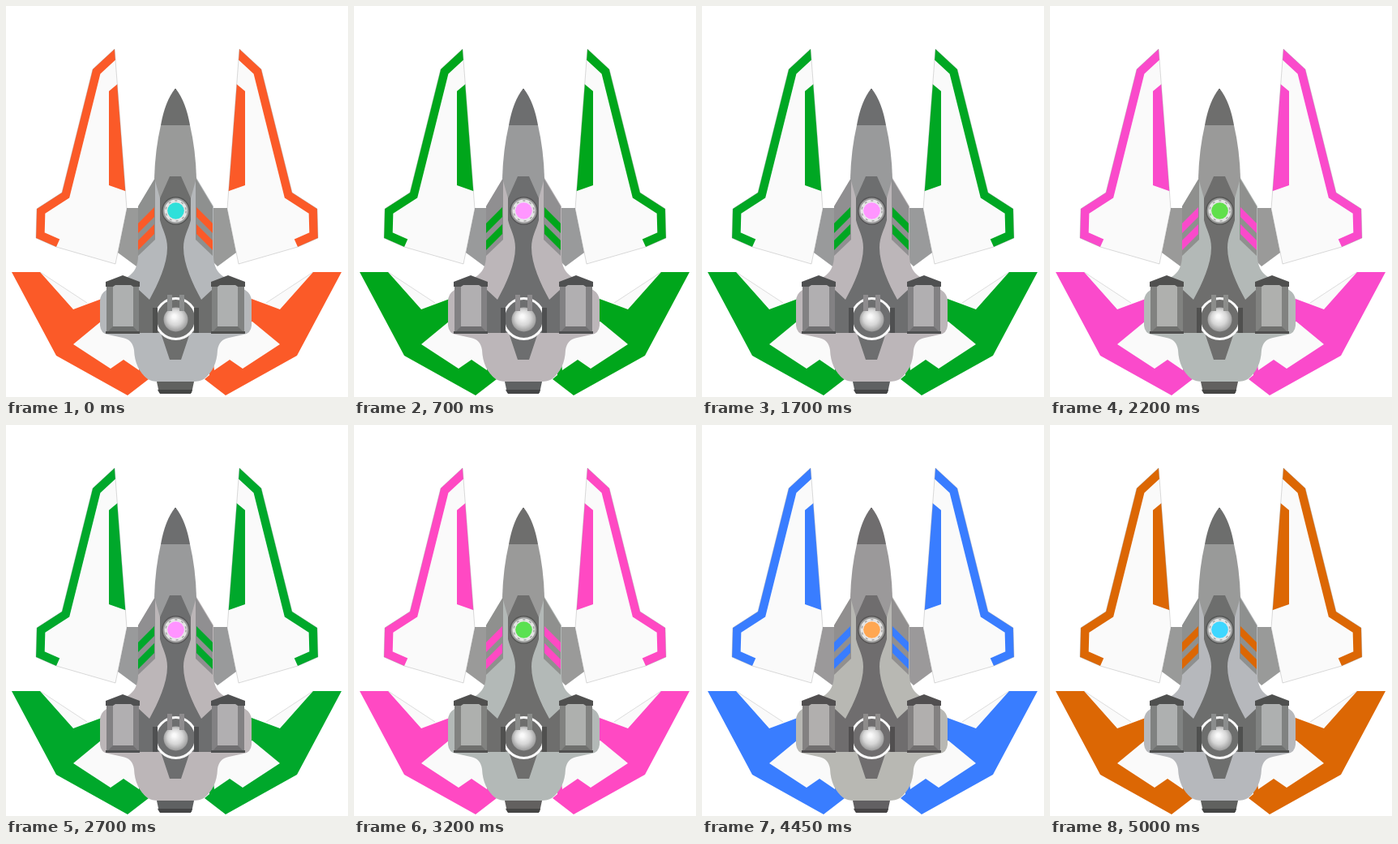
An HTML page with a canvas that plays this animation: 422 by 482 pixels, repeating every 5050 ms.

```html
<!DOCTYPE html>
<html lang="en">
<head>
<meta charset="utf-8">
<title>Colour-cycling starship</title>
<style>
  html, body { margin: 0; width: 100%; height: 100%; overflow: hidden; background: #fff; }
  canvas { display: block; width: 422px; height: 482px; }
</style>
</head>
<body>
<canvas id="stage" width="422" height="482"></canvas>
<script>
const canvas = document.getElementById('stage');
const ctx = canvas.getContext('2d');

const STEP = 50, STEPS = 101, TURNS = 5;
const BODY_AXIS = 209, HULL_AXIS = 209.5, WING_AXIS = 211, TAIL_AXIS = 210.5;
const ORANGE = '#fb5a28', WHITE = '#fafafa';
const LIGHT = '#b5b8bb', MID = '#999a99', DARK = '#6d6e6d', DEEP = '#4f504f';

function fill(path, color) {
  ctx.fillStyle = color;
  ctx.fill(new Path2D(path));
}

function stroke(path, width, color) {
  ctx.strokeStyle = color;
  ctx.lineWidth = width;
  ctx.stroke(new Path2D(path));
}

function rect(x, y, w, h, color) {
  ctx.fillStyle = color;
  ctx.fillRect(x, y, w, h);
}

function disc(x, y, r, color) {
  ctx.fillStyle = color;
  ctx.beginPath();
  ctx.arc(x, y, r, 0, Math.PI * 2);
  ctx.fill();
}

function ring(x, y, r, width, color) {
  ctx.strokeStyle = color;
  ctx.lineWidth = width;
  ctx.beginPath();
  ctx.arc(x, y, r, 0, Math.PI * 2);
  ctx.stroke();
}

// Draws a left-hand part and its reflection about the line x = axis.
function mirrored(axis, draw) {
  draw();
  ctx.save();
  ctx.translate(axis * 2, 0);
  ctx.scale(-1, 1);
  draw();
  ctx.restore();
}

// The orange border is a thick stroke clipped to the wing.
function upperWing() {
  const edge = 'L107 78L69 230L38 250L37 286L62 297';
  const outline = `M134 53${edge}L135 318L149 250Z`;
  fill(outline, WHITE);
  ctx.save();
  ctx.clip(new Path2D(outline));
  stroke('M147 41' + edge, 21, ORANGE);
  fill('M127 105L150 86V229L127 221Z', ORANGE);
  ctx.restore();
  stroke(outline, 0.7, 'rgba(150,150,150,.5)');
}

function lowerWing() {
  fill('M42 328L100 366H120V376H83Z', WHITE);
  fill('M7 328H42L83 374L118 361L170 400V455L176 460L150 480L62 431Z', ORANGE);
  fill('M117 389L83 417L129 447L145 436L164 449L170 400Z', WHITE);
  stroke('M42 328L100 366', 0.7, 'rgba(150,150,150,.45)');
}

function fin() {
  fill('M149 249H166V316L161 321L138 304Z', MID);
}

function hull() {
  fill('M210 212H184L163 247V308Q163 326 150 334L124 350Q116 355 116 364V394' +
    'Q117 404 126 405L144 409Q156 411 158 424Q159 448 175 460Q180 463 188 463H210Z', LIGHT);
}

function sidePanel() {
  fill('M184 212L163 247V308L184 288Z', '#8e908f');
  for (const y of [268, 289]) fill(`M163 ${y}l20 -20v12l-20 20Z`, ORANGE);
}

function fuselage() {
  fill('M210 147H191Q184 177 183 212L190 237H210Z', MID);
  fill('M210 102H208.5Q196 118 191 147H210Z', DARK);
  fill('M210 210H202L190 237V264C193 276 199 284 199 298C199 318 188 342 177 362' +
    'L164 350V403H191L202 436H210Z', DARK);
}

function pod() {
  rect(124, 344, 40, 59, '#808281');
  rect(132, 344, 25, 51, '#aeb0b0');
  fill('M132 395H157L164 403H124Z', '#6e706f');
  fill('M123 340L144 332L165 340V346H157L154 344H135L132 346H123Z', DEEP);
  rect(123, 401, 42, 3, DEEP);
}

function cockpit() {
  const x = 209.5, y = 252.5;
  disc(x, y, 17.5, '#555756');
  disc(x, y, 16, '#9a9b9b');
  disc(x, y, 14, '#e4e5e5');
  ctx.setLineDash([3, 5.2]);
  ring(x, y, 12.5, 1.4, '#a0a3a3');
  ctx.setLineDash([]);
  disc(x, y, 10.3, '#2fe0da');
}

function turret() {
  const x = 209.5, y = 385.5;
  disc(x, y, 25, DARK);
  ring(x, y, 25, 3, WHITE);
  mirrored(x, () => rect(181, 372, 6, 31, DEEP));
  const shade = ctx.createRadialGradient(x - 2, y - 3, 2, x, y, 15.5);
  shade.addColorStop(0, '#fafafa');
  shade.addColorStop(0.55, '#d6d6d6');
  shade.addColorStop(1, '#9c9c9c');
  disc(x, y + 1, 15, shade);
  mirrored(x, () => rect(199, 356, 6, 20, '#8b8d8d'));
}

function tail() {
  fill('M186 463H232L229 477H189Z', '#60615f');
  fill('M187 473H230L228 478H190Z', '#444544');
}

function drawShip() {
  rect(0, 0, 422, 482, '#fff');
  mirrored(TAIL_AXIS, lowerWing);
  mirrored(WING_AXIS, fin);
  mirrored(WING_AXIS, upperWing);
  tail();
  mirrored(HULL_AXIS, hull);
  mirrored(BODY_AXIS, sidePanel);
  mirrored(BODY_AXIS, fuselage);
  mirrored(BODY_AXIS, pod);
  turret();
  cockpit();
}

// The whole picture turns through the hues in equal steps.
function tick(now) {
  const step = Math.floor(now / STEP) % STEPS;
  canvas.style.filter = `hue-rotate(${-360 * TURNS * step / STEPS}deg)`;
  requestAnimationFrame(tick);
}

drawShip();
tick(performance.now());
</script>
</body>
</html>
```
